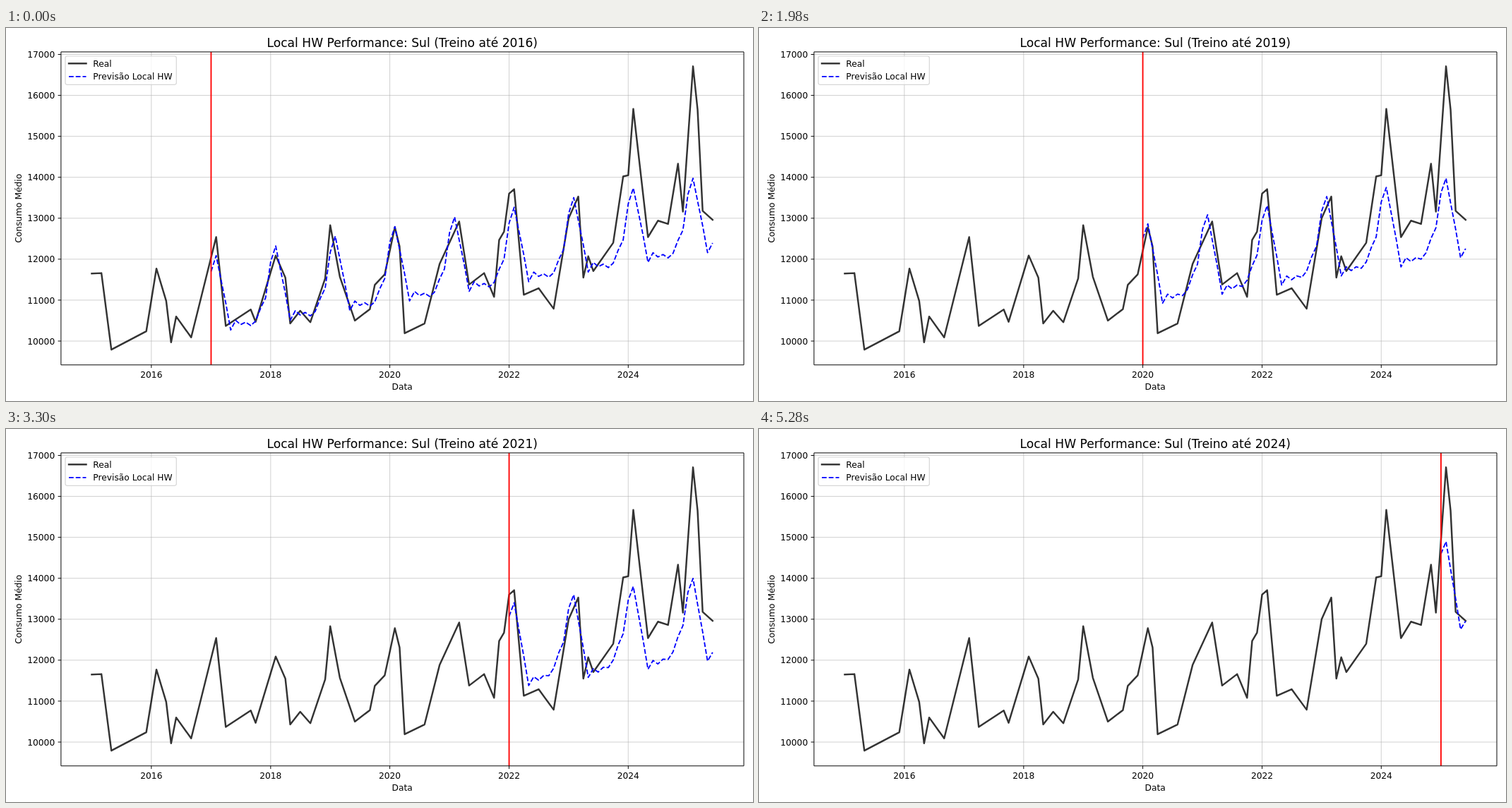
An HTML page that plays this animation: 1058 by 529 pixels, repeating every 5.94 s.

```html
<!DOCTYPE html>
<html lang="pt">
<head>
<meta charset="utf-8">
<style>
  html, body { margin: 0; width: 100%; height: 100%; overflow: hidden; background: #fff; }
  svg { display: block; width: 1058px; height: 529px; font: 12.25px "DejaVu Sans", sans-serif; }
  .grid { stroke: #b0b0b0; stroke-opacity: .6; stroke-width: .98; }
  .axis { stroke: #000; stroke-width: .98; fill: none; }
  .real, .forecast { fill: none; stroke-linejoin: round; }
  .real { stroke: #000; stroke-opacity: .8; stroke-width: 2.45; stroke-linecap: square; }
  .forecast { stroke: #00f; stroke-width: 1.84; stroke-dasharray: 6.8 2.94; }
  .cut { stroke: #f00; stroke-width: 1.84; }
  .middle { text-anchor: middle; }
  .end { text-anchor: end; }
</style>
</head>
<body>
<svg id="chart" viewBox="0 0 1058 529"></svg>
<script>
const STEP_MS = 660, FIRST_YEAR = 2016, MONTHS = 126;
const LEFT = 77.9, RIGHT = 1045, TOP = 33.9, BOTTOM = 477.8;
const chart = document.getElementById('chart');

// Turning points of consumption, one row per year from 2015: [month, tens]
const turns = [
  [[0, 1165], [2, 1166], [4, 979], [11, 1024]],
  [[1, 1177], [3, 1098], [4, 997], [5, 1060], [8, 1009]],
  [[1, 1254], [3, 1037], [8, 1077], [9, 1047]],
  [[1, 1209], [3, 1155], [4, 1043], [6, 1074], [8, 1046], [11, 1153]],
  [[0, 1283], [2, 1157], [5, 1050], [8, 1078], [9, 1137], [11, 1163]],
  [[1, 1278], [2, 1231], [3, 1019], [7, 1043], [10, 1188]],
  [[2, 1292], [4, 1138], [7, 1166], [9, 1108], [10, 1247], [11, 1267]],
  [[0, 1360], [1, 1371], [3, 1113], [6, 1129], [9, 1079]],
  [[0, 1300], [2, 1353], [3, 1155], [4, 1207], [5, 1171], [9, 1240], [11, 1402]],
  [[0, 1405], [1, 1567], [4, 1254], [6, 1294], [8, 1286], [10, 1433], [11, 1316]],
  [[1, 1671], [2, 1565], [3, 1318], [5, 1296]]
];

// Forecast = trained level + yearly growth + seasonal offset
const levels = [1088, 1119, 1139, 1161, 1183, 1212, 1167, 1303, 1357];
const season = [91, 126, 65, 0, -70, -48, -57, -47, -50, -34, 2, 28];

function predict(step, month) {
  const growth = 23.6 - .15 * step ** 2;
  const lean = 3 * (step - 3.5) * Math.cos(Math.PI * (month + 1) / 6);
  return levels[step] + growth * Math.floor(month / 12) + season[month % 12] + lean;
}

const xOf = month => 121.5 + (Date.UTC(2015, month, 1) - Date.UTC(2015, 0, 1)) / 864e5 * .23115;
const yOf = tens => 444 - (tens - 1000) * .5807;
const pathOf = points =>
  'M' + points.map(([m, v]) => `${xOf(m).toFixed(2)} ${yOf(v).toFixed(2)}`).join('L');

function add(tag, attrs, text = '') {
  const node = document.createElementNS('http://www.w3.org/2000/svg', tag);
  for (const key in attrs) node.setAttribute(key, attrs[key]);
  node.textContent = text;
  return chart.appendChild(node);
}
const line = (cls, d) => add('path', { class: cls, d });
const label = (text, x, y, cls = '', more = {}) => add('text', { x, y, class: cls, ...more }, text);

for (let year = 2016; year <= 2024; year += 2) {
  const x = xOf((year - 2015) * 12);
  line('grid', `M${x} ${TOP}V${BOTTOM}`);
  line('axis', `M${x} ${BOTTOM}v4.3`);
  label(year, x, 495.6, 'middle');
}
for (let value = 10000; value <= 17000; value += 1000) {
  const y = yOf(value / 10);
  line('grid', `M${LEFT} ${y}H${RIGHT}`);
  line('axis', `M${LEFT} ${y}h-4.3`);
  label(value, 69.2, y + 4.6, 'end');
}

line('real', pathOf(turns.flatMap((row, year) => row.map(([m, v]) => [year * 12 + m, v]))));
const forecast = line('forecast', '');
const cut = line('cut', '');
line('axis', `M${LEFT} ${TOP}H${RIGHT}V${BOTTOM}H${LEFT}Z`);

const title = label('', 561.2, 26.5, 'middle', { 'font-size': 17.14 });
label('Data', 561.2, 513.4, 'middle');
label('Consumo Médio', 0, 0, 'middle', { transform: 'translate(22 255.8) rotate(-90)' });

add('rect', { x: 84, y: 40, width: 157.3, height: 40.3, rx: 2.45,
  fill: '#fff', 'fill-opacity': .8, stroke: '#ccc', 'stroke-opacity': .8, 'stroke-width': 1.22 });
line('real', 'M89 50.3h24.5');
line('forecast', 'M89 68.9h24.5');
label('Real', 123.3, 54.8);
label('Previsão Local HW', 123.3, 73.2);

let shown = -1;
function draw(now) {
  const step = Math.floor(now / STEP_MS) % levels.length;
  if (step !== shown) {
    shown = step;
    const start = (step + 2) * 12;
    const points = Array.from({ length: MONTHS - start }, (_, i) => [start + i, predict(step, i)]);
    forecast.setAttribute('d', pathOf(points));
    cut.setAttribute('d', `M${xOf(start)} ${TOP}V${BOTTOM}`);
    title.textContent = `Local HW Performance: Sul (Treino até ${FIRST_YEAR + step})`;
  }
  requestAnimationFrame(draw);
}
draw(performance.now());
</script>
</body>
</html>
```
